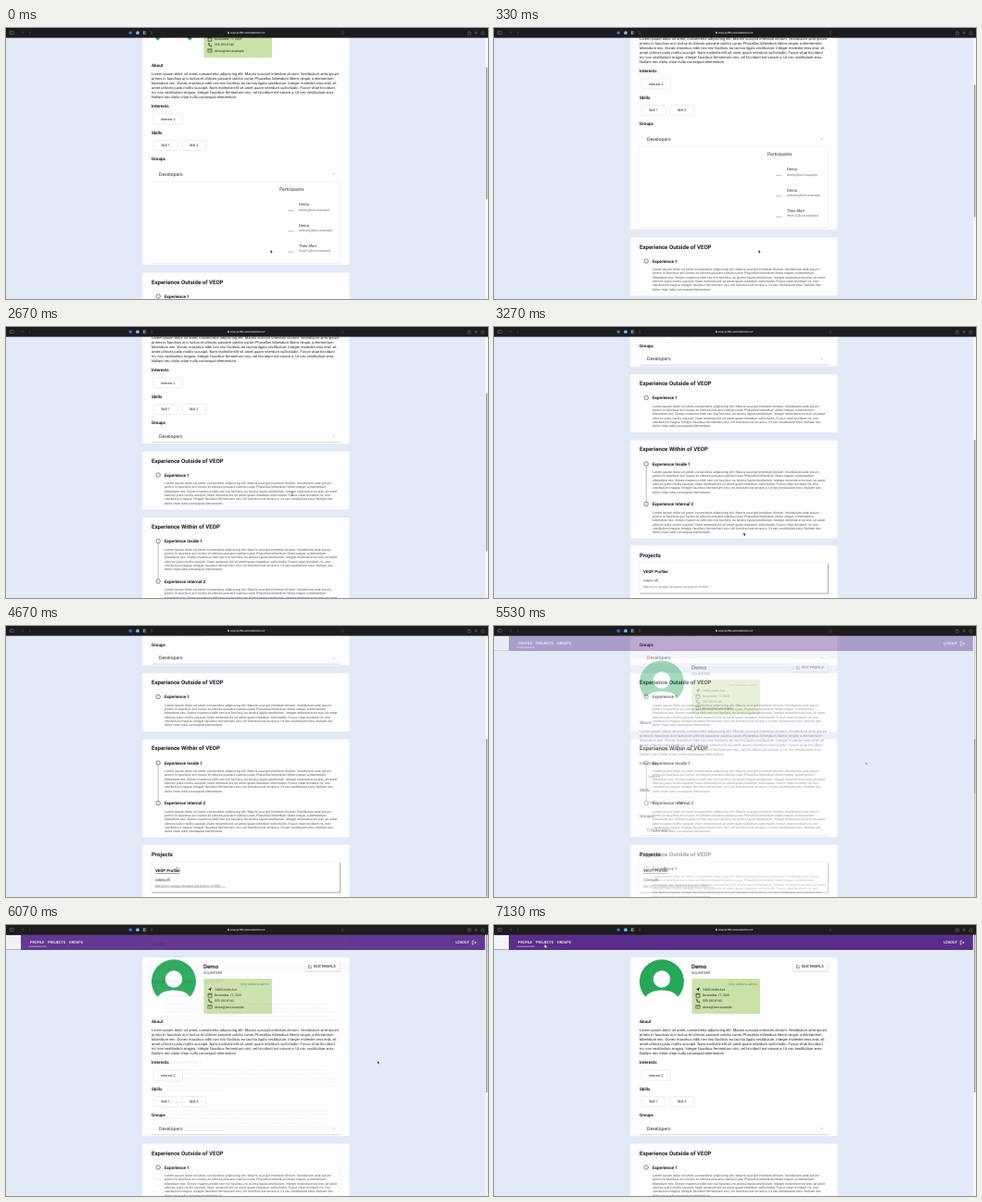
An HTML page that plays this animation: 520x293 px, repeating every 8000 ms.

```html
<!DOCTYPE html>
<html lang="en">
<head>
<meta charset="utf-8">
<title>Profile page walkthrough</title>
<style>
  html, body { margin: 0; width: 100%; height: 100%; overflow: hidden; background: #e1eaf6; }
  #stage { display: block; width: 100%; height: 100%; font-family: Roboto, sans-serif; text-rendering: geometricPrecision; fill: #1c1c1e; }
  .hover text { text-decoration: underline; }
</style>
</head>
<body>
<svg id="stage" viewBox="0 0 520 293"></svg>
<script>
const LOOP = 8000, BAR = 10.6, VIEW = 283, DOC = 468.5, BODY = 92;

// "/" breaks the wide paragraph, "|" the narrow one
const LOREM = 'Lorem ipsum dolor sit amet, consectetur adipiscing elit. Mauris suscipit interdum dictum. Vestibulum ante ipsum /|' +
  'primis in faucibus orci luctus et ultrices posuere cubilia curae; Phasellus bibendum libero neque, a elementum /|' +
  'bibendum nec. Donec maximus nibh nec nisi facilisis, eu lacinia ligula vestibulum. Integer molestie eros erat, sit /amet |' +
  'ultrices justo mollis suscipit. Nam molestie elit sit amet quam interdum sollicitudin. Fusce vitae tincidunt /mi, non |' +
  'vestibulum magna. Integer faucibus fermentum orci, vel tincidunt est ornare a. Ut nec vestibulum eros. /Nullam nec |' +
  'dolor vitae nulla consequat elementum.';
const WIDE = LOREM.replace(/\|/g, '').split('/');
const NARROW = LOREM.replace(/\//g, '').split('|');

// Markup helpers
const text = (x, y, size, str, attrs = '') => `<text x="${x}" y="${y}" font-size="${size}" ${attrs}>${str}</text>`;
const bold = (x, y, size, str) => text(x, y, size, str, 'font-weight="700"');
const rect = (x, y, w, h, attrs) => `<rect x="${x}" y="${y}" width="${w}" height="${h}" ${attrs}/>`;
const stroke = (d, color, width, attrs = '') => `<path d="${d}" fill="none" stroke="${color}" stroke-width="${width}" ${attrs}/>`;
const card = (y, h, attrs = '') => rect(147, y, 223.5, h, `rx="1.5" fill="#fefdff" ${attrs}`);
const paragraph = (lines, x, y, size, step, color) =>
  lines.map((line, i) => text(x, y + i * step, size, line, `fill="${color}"`)).join('');
const chip = (x, y, w, label) => rect(x, y, w, 11, 'rx="1" fill="#fff" stroke="#dedee0" stroke-width=".5"') +
  text(x + w / 2, y + 6.9, 3.7, label, 'text-anchor="middle"');
const experience = (y, label) => `<circle cx="164.2" cy="${y}" r="2.2" fill="#fff" stroke="#333" stroke-width=".6"/>` +
  bold(171, y + 1.8, 4.68, label) + paragraph(NARROW, 171, y + 10.2, 3.6, 4.27, '#5a5a5a');
const participant = (y, name, mail) => text(316, y + 1.4, 4.2, name, 'fill="#333"') + text(316, y + 6.5, 3.6, mail, 'fill="#707070"') +
  stroke(`M304.5 ${y + 6.2}q2.8 .8 5.6 0`, '#62bd90', .7);

const navBar = () => rect(0, 10, 517, 17, 'fill="#5b2d8a"') + rect(0, 11, 16, 15.6, 'fill="#f4f3f5"') +
  `<g fill="#fff" font-weight="500">${text(26, 20.3, 3.92, 'PROFILE')}${text(45, 20.3, 3.92, 'PROJECTS')}` +
  `${text(68, 20.3, 3.92, 'GROUPS')}${text(485, 20.3, 3.92, 'LOGOUT')}</g>` +
  stroke('M24.5 23.2h19', '#fff', .5) +
  stroke('M505 17h-1.8v4h1.8M504.6 19h2.6m-1-1l1 1l-1 1', '#fff', .6);

const avatar = () => '<path d="M168.2 81.5A24 24 0 1 1 193.8 81.5z" fill="#27a758"/>' +
  '<circle cx="181" cy="58.5" r="9.2" fill="#fefdff"/><path d="M162 82C164 74 171 70.5 181 70.5S198 74 200 82z" fill="#fefdff"/>';

const contact = () => rect(213.4, 58, 73.7, 38, 'rx="1" fill="#c9e2a8"') +
  text(283.5, 64.8, 3.3, 'Only visible to admin', 'text-anchor="end" fill="#67785a"') +
  ['2400 Lindle Ave', 'November 17, 2021', '555 010 0142', 'demo@lum.example']
    .map((str, i) => text(225, 70.7 + i * 6.35, 3.45, str)).join('') +
  '<path d="M217.9 69.6l4.2-2l-2 4.2l-.4-1.8z"/>' +
  stroke('M218 74.2h4v4h-4zM218 75h4M218.3 80.4c0 2 1.6 3.6 3.6 3.6v-1l-1-.3l-.5.5l-1.3-1.3l.5-.5l-.3-1z', '#1c2418', .6) +
  stroke('M217.8 86.8h4.4v3.4h-4.4zl2.2 1.6l2.2-1.6', '#1c2418', .5);

const profile = () => card(35, 193, 'class="profile"') + avatar() +
  bold(213, 47.2, 6.2, 'Demo') + text(213, 52.9, 3.7, 'VOLUNTEER', 'fill="#333"') +
  rect(322.6, 40.4, 38, 10, 'rx="1" fill="#ccc"') + rect(322.4, 40, 38, 9.8, 'rx="1" fill="#fff" stroke="#e4e4e4" stroke-width=".4"') +
  stroke('M328 43.5h-1.6v3.2h3.2v-1.5M327.6 45.6l2.2-2.3', '#333', .5) +
  text(332, 46.4, 3.8, 'EDIT PROFILE', 'font-weight="500"') + contact() +
  bold(157, 105.6, 4.65, 'About') + paragraph(WIDE, 157, 115.4, 4.05, 4.87, '#2a2a2a') +
  bold(157, 149.8, 4.65, 'Interests') + chip(159, 157, 31.5, 'Interest 2') +
  bold(157, 178.6, 4.65, 'Skills') + chip(159, 185.5, 26, 'Skill 1') + chip(189.5, 185.5, 26, 'Skill 2') +
  bold(157, 207, 4.65, 'Groups') +
  `<g class="header">${text(165, 221.8, 5.2, 'Developers', 'fill="#333"')}` +
  `${stroke('M-1.2 -.5L0 .6L1.2 -.5', '#808080', .5, 'class="chevron"')}</g>` +
  `<svg class="body" width="520" height="226">` +
  rect(157, 230.5, 203.5, 120, 'fill="#fefdff" stroke="#f0eff2" stroke-width=".5"') +
  text(295, 239.8, 4.95, 'Participants', 'fill="#333"') +
  participant(255, 'Demo', 'demo@lum.example') + participant(277.4, 'Demo', 'anteam@lum.example') +
  participant(299.8, 'Theo Marl', 'tmarl1@lum.example') + '</svg>';

const lowerCards = () => stroke('M157 226.6h203.5', '#b4b4b4', .5, 'class="edge"') +
  card(236.5, 63) + bold(157, 248.5, 6.13, 'Experience Outside of VEOP') + experience(262, 'Experience 1') +
  card(308, 106) + bold(157, 319.9, 6.13, 'Experience Within of VEOP') +
  stroke('M164.2 336v38.5', '#777', .5) + experience(333.5, 'Experience Inside 1') + experience(377, 'Experience Internal 2') +
  card(422, 70) + bold(157, 434.5, 6.13, 'Projects') +
  rect(157.4, 441, 203.6, 33, 'rx="1" fill="#8e8e8e"') + rect(157, 440.5, 203.2, 32.8, 'rx="1" fill="#fff" stroke="#ddd" stroke-width=".3"') +
  `<g class="project">${bold(161, 451.5, 4.4, 'VEOP Profiler')}${text(161, 460.2, 3.2, 'Calgary, AB', 'fill="#333"')}` +
  `${text(161, 467.1, 3, 'Web tool to manage volunteers and projects of VEOP ......', 'fill="#666"')}</g>`;

const CURSORS = {
  arrow: '<path d="M0 0v3.1l.7-.6l.6 1.1l.6-.3l-.5-1.1h1z" fill="#000" stroke="#fff" stroke-width=".2"/>',
  hand: '<path d="M-.4 .3q.4-.5.8 0v1.1l1.2.3q.4.2.3.7l-.3 1.2h-1.8l-1.2-1.5q0-.6.7-.1z" fill="#fff" stroke="#444" stroke-width=".4"/>',
  beam: stroke('M-.8 0q.8 0 .8.5q0-.5.8-.5M0 .4v3M-.8 3.9q.8 0 .8-.5q0 .5.8.5', '#333', .4)
};

const page = () => rect(0, 0, 520, 293, 'fill="#e1eaf6"') +
  `<g class="scroll">${navBar()}${profile()}<g class="lower">${lowerCards()}</g></g>` +
  rect(516.8, 10, 3.2, 283, 'fill="#f3f5f8"') + rect(517.9, 10, 1.4, 171, 'class="thumb" rx=".7" fill="#909296"') +
  '<g class="cursor"></g>';

const browserBar = () => rect(0, 0, 520, BAR, 'fill="#1c1c1e"') +
  stroke('M4 3.6h4.4v3h-4.4zM5.5 3.6v3M19 3.6l-1.4 1.5l1.4 1.5M500 4.4h-1.7v2.8h3v-2.8h-1.1M499.8 5.8v-3M507 3.4v3.6M505.2 5.2h3.6M513 4.3h2.8v2.8h-2.8z', '#8a8a8e', .4) +
  stroke('M25 3.6l1.4 1.5l-1.4 1.5M156.2 4h2M156.2 5.2h2M156.2 6.4h2M364.4 4.4a1.3 1.3 0 1 0 .2 1.2', '#707074', .4) +
  '<circle cx="134.3" cy="5.2" r="1.8" fill="#3a6fc4"/><circle cx="142" cy="5.2" r="1.9" fill="#6cbcf0"/>' +
  stroke('M148.2 3.6h2.8v3.2h-2.8z', '#a9a9ad', .4) + rect(148.2, 3.6, 1.4, 3.2, 'fill="#a9a9ad"') +
  rect(239.2, 4.6, 1.6, 1.5, 'fill="#ddd"') + stroke('M239.5 4.7v-.6q.5-.7 1 0v.6', '#ddd', .3) +
  text(242, 6.1, 2.72, 'veop-profile.azurewebsites.net', 'fill="#eee" font-weight="500"');

const stage = document.getElementById('stage');
stage.innerHTML = `<g>${page()}</g><g>${page()}</g>${browserBar()}`;
const [first, second] = stage.children;

function setPage(layer, { scroll, open, hover, cursor, kind }) {
  const set = (name, attr, value) => layer.querySelector('.' + name).setAttribute(attr, value);
  const ratio = VIEW / (DOC + BODY * open);
  set('scroll', 'transform', `translate(0 ${-scroll})`);
  set('profile', 'height', 193 + BODY * open);
  set('body', 'height', 226.4 + BODY * open);
  set('header', 'transform', `translate(0 ${2 * open})`);
  set('chevron', 'transform', `translate(353.5 220) rotate(${180 * open})`);
  set('lower', 'transform', `translate(0 ${BODY * open})`);
  set('edge', 'opacity', 1 - .6 * open);
  set('thumb', 'y', 10 + scroll * ratio);
  set('thumb', 'height', VIEW * ratio);
  set('cursor', 'transform', `translate(${cursor})`);
  layer.querySelector('.project').classList.toggle('hover', hover);
  layer.querySelector('.cursor').innerHTML = CURSORS[kind];
}

const clamp = v => Math.min(1, Math.max(0, v));

// Eased value at time t through keys of [time, ...values]
function track(t, keys) {
  const next = keys.findIndex(key => key[0] > t);
  if (next === 0) return keys[0].slice(1);
  if (next < 0) return keys[keys.length - 1].slice(1);
  const a = keys[next - 1], b = keys[next], p = (t - a[0]) / (b[0] - a[0]), e = p * p * (3 - 2 * p);
  return a.slice(1).map((v, i) => v + (b[i + 1] - v) * e);
}

const SCROLL = [[50, 64], [330, 102], [2680, 102], [2930, 185.5]];
const OPEN = [[2170, 1], [2520, 0]];
const POINTER = [[470, 285.4, 240], [1200, 305.8, 122.8], [2220, 305.8, 122.8], [2620, 308.6, 178.4], [3070, 308.6, 178.4],
  [3520, 215, 283], [3800, 186, 263], [4040, 186, 263], [4200, 119, 270], [4400, 184.8, 260.8],
  [4600, 184.8, 260.8], [4670, 184.4, 260.4], [5130, 184.4, 260.4]];
const POINTER_TOP = [[6240, 400.8, 147], [7070, 55.2, 20.8]];

const isOverProject = t => (t > 3430 && t < 4090) || t > 4310;

function kindAt(t) {
  if (t < 1050) return 'arrow';
  if (t < 2300) return 'hand';
  if (t < 2560) return 'arrow';
  if (t < 3120) return 'beam';
  return isOverProject(t) ? 'hand' : 'arrow';
}

function frame(now) {
  const t = now % LOOP;
  setPage(first, {
    scroll: track(t, SCROLL)[0], open: track(t, OPEN)[0], hover: isOverProject(t),
    cursor: track(t, POINTER), kind: kindAt(t)
  });
  setPage(second, {
    scroll: 0, open: 0, hover: false,
    cursor: track(t, POINTER_TOP), kind: t < 7100 ? 'arrow' : 'hand'
  });
  second.setAttribute('opacity', clamp((t - 5130) / 1000));
  requestAnimationFrame(frame);
}
requestAnimationFrame(frame);
</script>
</body>
</html>
```
